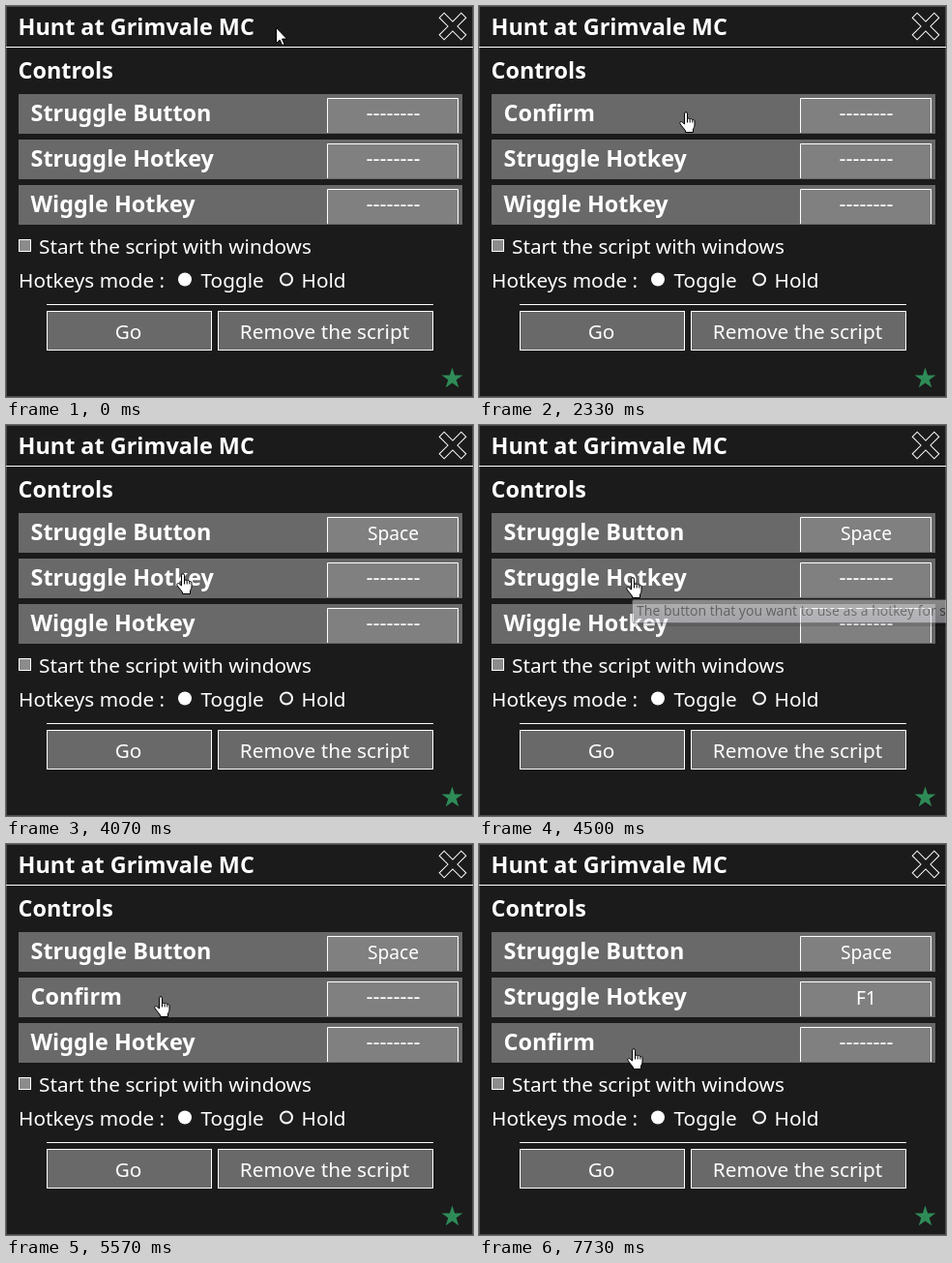
An HTML page for the animation above (8 s loop, 483 px wide and 404 px high).

```html
<!DOCTYPE html>
<html lang="en">
<head>
<meta charset="utf-8">
<title>Controls</title>
<style>
  html, body { margin: 0; width: 100%; height: 100%; overflow: hidden; background: #1b1b1b; }
  svg { display: block; width: 483px; height: 404px; }
  text { font: 20.75px "Noto Sans", "Open Sans", sans-serif; fill: #fff; white-space: pre; }
  .bold { font-size: 23.4px; font-weight: 700; }
  .mid { text-anchor: middle; }
  .key { font-size: 19.2px; }
  .key.empty { font-size: 21.7px; }
  .button { fill: #696969; stroke: #fff; }
  .line { fill: none; stroke: #fff; }
  #tip text { font: 14.05px "Open Sans", sans-serif; fill: #575757; }
  .pointer path { fill: #fff; stroke: #000; stroke-linejoin: round; }
</style>
</head>
<body>
<svg viewBox="0 0 483 404">
  <defs>
    <linearGradient id="paper" x2="0" y2="1">
      <stop stop-color="#fff"/><stop offset="1" stop-color="#e4e5f0"/>
    </linearGradient>
  </defs>
  <rect x=".5" y=".5" width="482" height="403" fill="#1b1b1b" stroke="#4a4a4a"/>
  <text class="bold" x="12.5" y="30">Hunt at Grimvale MC</text>
  <path class="line" d="M0 42.5H483"/>
  <path class="line" transform="translate(462 21) rotate(45)"
    d="M-3.5-3.5V-16H3.5V-3.5H16V3.5H3.5V16H-3.5V3.5H-16V-3.5z"/>
  <text class="bold" x="12.5" y="75">Controls</text>
  <g id="rows"></g>

  <rect x="13.5" y="241.5" width="12" height="12" fill="#8c8c8c" stroke="#fff"/>
  <text x="34" y="256">Start the script with windows</text>
  <text x="13" y="291">Hotkeys mode :</text>
  <circle cx="185" cy="282.5" r="7" fill="#fff"/>
  <text x="201.5" y="291">Toggle</text>
  <circle cx="290" cy="282.5" r="6" fill="#2b2b2b" stroke="#fff" stroke-width="2"/>
  <text x="305.5" y="291">Hold</text>

  <path class="line" d="M42 308.5H442"/>
  <rect class="button" x="42.5" y="315.5" width="170" height="40"/>
  <text class="mid" x="126.5" y="344">Go</text>
  <rect class="button" x="219.5" y="315.5" width="222" height="40"/>
  <text class="mid" x="329.5" y="344">Remove the script</text>
  <path id="star" fill="#2e8b57"/>

  <g id="tip">
    <rect x="2" y="3" width="340" height="25" rx="3" fill="#000" opacity=".25"/>
    <rect x=".5" y=".5" width="340" height="24" rx="2" fill="url(#paper)" stroke="#767676"/>
    <text x="5" y="17"></text>
  </g>
  <g id="arrow" class="pointer">
    <path d="M.5.5V16.5L4.2 13 6.7 18.6 9 17.6 6.6 12H11.5z"/>
  </g>
  <g id="hand" class="pointer">
    <path d="M5.5 13V2.2a1.5 1.5 0 0 1 3 0V8c0-1.2 2.6-1.2 2.8.3.3-1 2.5-.8 2.6.6.4-.8 2.1-.5 2.1 1V14c0 2-1.5 3.5-1.5 5v2.5H6.5V20C5 17.5 2 14.5 1 12.5c-.8-1.8 1.2-2.6 2.3-1.3z"/>
    <path d="M8.5 8v3.5M11.2 8.5v3M13.8 9v2.5"/>
  </g>
</svg>
<script>
const LOOP = 8000, FRAME = 100 / 3;
const ROW_TOP = 91, ROW_STEP = 47, ROW_HEIGHT = 41;
const $ = id => document.getElementById(id);

// confirm: time span of the "Confirm" label; keyAt: when the key is entered
const rows = [
  { label: 'Struggle Button', confirm: [1860, 3490], key: 'Space', keyAt: 3360 },
  { label: 'Struggle Hotkey', confirm: [4790, 6690], key: 'F1', keyAt: 5890 },
  { label: 'Wiggle Hotkey', confirm: [7725, LOOP], key: '', keyAt: LOOP }
];

// Pointer hot spot: time, x, y
const path = [
  [0, 279, 22], [167, 279, 22], [233, 267, 31], [500, 267, 31], [833, 108, 115],
  [2000, 108, 115], [2033, 109, 115], [2133, 109, 115], [2333, 214, 109],
  [2500, 214, 109], [2533, 215, 109], [2667, 215, 109], [2800, 218, 106],
  [3630, 218, 106], [4067, 183, 153], [4167, 165, 157], [4300, 159, 157],
  [5533, 159, 157], [5567, 160, 157], [6667, 160, 157], [6700, 163, 157],
  [6933, 163, 157], [7067, 166, 166], [7300, 160, 211], [LOOP, 160, 211]
];

const tips = [
  { start: 4460, end: 4790, y: 180, text: 'struggling' },
  { start: 7595, end: 7725, y: 234, text: 'wiggling' }
];

$('rows').innerHTML = rows.map((row, i) => `
  <g transform="translate(0 ${ROW_TOP + i * ROW_STEP})">
    <rect x="13" width="459" height="${ROW_HEIGHT}" fill="#696969"/>
    <text class="bold label" x="25.5" y="28"></text>
    <path fill="#808080" stroke="#fff" d="M332.5 40V4.5H467.5V40"/>
    <text class="mid key" x="400.5"></text>
  </g>`).join('');
const labels = document.querySelectorAll('.label');
const keys = document.querySelectorAll('.key');

$('star').setAttribute('d', 'M' + Array.from({ length: 10 }, (_, i) => {
  const radius = i % 2 ? 4.4 : 11.5, angle = i * Math.PI / 5;
  return [461.5 + radius * Math.sin(angle), 385 - radius * Math.cos(angle)];
}).join('L') + 'z');

function pointerAt(t) {
  const i = Math.max(1, path.findIndex(p => p[0] > t));
  const [t0, x0, y0] = path[i - 1], [t1, x1, y1] = path[i];
  const p = (t - t0) / (t1 - t0);
  return [Math.round(x0 + (x1 - x0) * p), Math.round(y0 + (y1 - y0) * p)];
}

function place(node, x, y, visible) {
  node.setAttribute('transform', `translate(${x} ${y})`);
  node.style.display = visible ? '' : 'none';
}

function draw(t) {
  rows.forEach((row, i) => {
    const confirming = t >= row.confirm[0] && t < row.confirm[1];
    const entered = t >= row.keyAt;
    labels[i].textContent = confirming ? 'Confirm' : row.label;
    keys[i].textContent = entered ? row.key : '--------';
    keys[i].classList.toggle('empty', !entered);
    keys[i].setAttribute('y', entered ? 28 : 27);
  });

  const [x, y] = pointerAt(t);
  const overRow = y >= ROW_TOP && (y - ROW_TOP) % ROW_STEP < ROW_HEIGHT;
  place($('arrow'), x, y, !overRow);
  place($('hand'), x - 7, y, overRow);

  const tip = tips.find(tip => t >= tip.start && t < tip.end);
  place($('tip'), 158, tip ? tip.y : 0, tip);
  if (tip) {
    const p = Math.min(1, (t - tip.start + FRAME) / 267);
    $('tip').setAttribute('opacity', 1 - (1 - p) ** 2);
    $('tip').querySelector('text').textContent =
      'The button that you want to use as a hotkey for ' + tip.text;
  }
}

// The screen updates 30 times a second, with steps taken slightly early
function tick() {
  const t = performance.now() % LOOP;
  draw(Math.min(LOOP - 1, Math.floor((t + 5) / FRAME) * FRAME));
  requestAnimationFrame(tick);
}
tick();
</script>
</body>
</html>
```
